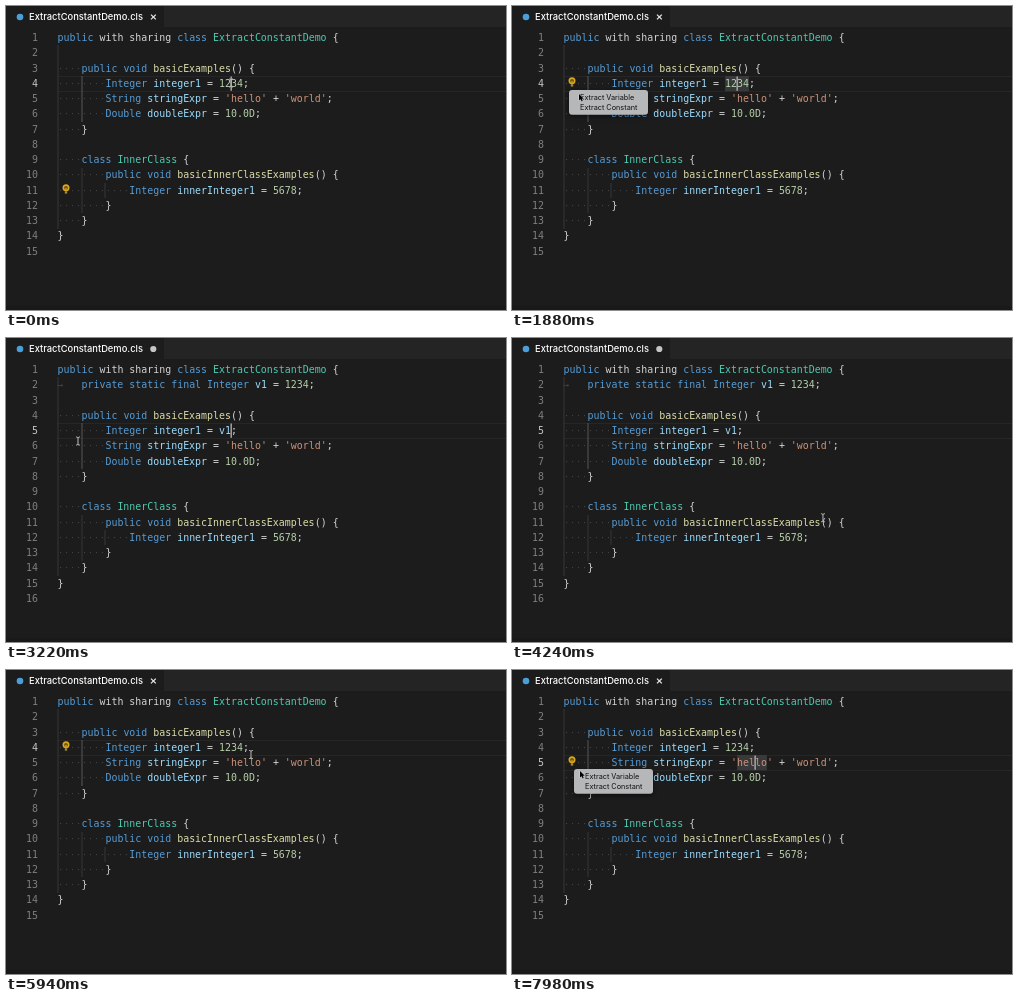
Recreate the animation shown at these times as an HTML page with a canvas. Size 500 by 304 pixels, loop 8000 ms.

```html
<!DOCTYPE html>
<html lang="en">
<head>
<meta charset="utf-8">
<title>Extract constant</title>
<style>
  html, body { margin: 0; width: 100%; height: 100%; overflow: hidden; background: #1c1c1c; }
  canvas { display: block; width: 500px; height: 304px; }
</style>
</head>
<body>
<canvas id="stage"></canvas>
<script>
const W = 500, H = 304, LOOP = 8000;
const canvas = document.getElementById('stage');
const ctx = canvas.getContext('2d');
const dpr = window.devicePixelRatio || 1;
canvas.width = W * dpr;
canvas.height = H * dpr;

const MONO = '9.93px "DejaVu Sans Mono", monospace';
const UI = 'Inter, "Open Sans", sans-serif';
const X0 = 51.6, CHAR = 5.98, TOP = 24.1, ROW = 15.27;

const colX = col => X0 + col * CHAR;
const rowY = line => Math.round(TOP + (line - 1) * ROW);
const baseY = line => Math.round(34.97 + (line - 1) * ROW);

const CODE = [
  'public with sharing class ExtractConstantDemo {',
  '',
  '    public void basicExamples() {',
  '        Integer integer1 = 1234;',
  "        String stringExpr = 'hello' + 'world';",
  '        Double doubleExpr = 10.0D;',
  '    }',
  '',
  '    class InnerClass {',
  '        public void basicInnerClassExamples() {',
  '            Integer innerInteger1 = 5678;',
  '        }',
  '    }',
  '}',
  ''
];

// The same file after the number became a constant
const EXTRACTED = CODE.map(s => s.replace('1234', 'v1'));
EXTRACTED.splice(1, 0, '\t   private static final Integer v1 = 1234;');

const RULES = [
  [/^'[^']*'/, '#ce9178'],
  [/^\d[\d.]*D?/, '#b5cea8'],
  [/^(public|private|static|final|class|void|Integer|String|Double)\b/, '#569cd6'],
  [/^(with|sharing)\b/, '#d4d4d4'],
  [/^(ExtractConstantDemo|InnerClass)\b/, '#4ec9b0'],
  [/^\w+(?=\()/, '#dcdcaa'],
  [/^\w+/, '#9cdcfe'],
  [/^[^\w\s']+/, '#d4d4d4']
];

function tokenize(line) {
  const out = [];
  let col = 0;
  while (col < line.length) {
    const rest = line.slice(col);
    const rule = RULES.find(([re]) => re.test(rest));
    const text = rule ? rest.match(rule[0])[0] : rest[0];
    if (rule) out.push({ col, text, color: rule[1] });
    col += text.length;
  }
  return out;
}

const makeDoc = lines => lines.map(s => ({
  indent: s.length - s.trimStart().length,
  tab: s[0] === '\t',
  tokens: tokenize(s)
}));
const plainDoc = makeDoc(CODE), editedDoc = makeDoc(EXTRACTED);

// Mouse path: time, x, y
const PATH = [
  [0, 225, 77], [200, 225, 77], [1000, 57, 77], [1720, 57, 77],
  [1880, 67, 88], [2100, 72, 97], [2420, 72, 101], [3220, 72, 103],
  [3360, 74, 103], [3460, 190, 196], [3580, 309, 182], [4160, 309, 182],
  [4780, 351, 134], [5340, 351, 134], [5940, 245, 84.5], [6300, 243, 91],
  [6500, 243, 91], [6960, 86, 84], [7080, 81, 85], [7400, 62, 92],
  [7600, 62, 92], [7980, 68, 101], [8000, 68, 101]
];

const within = (t, a, b) => t >= a && t < b;

function mouseAt(t) {
  const i = Math.max(1, PATH.findIndex(p => p[0] > t));
  const [ta, xa, ya] = PATH[i - 1], [tb, xb, yb] = PATH[i];
  const u = (t - ta) / (tb - ta), k = u * u * (3 - 2 * u);
  return { x: xa + (xb - xa) * k, y: ya + (yb - ya) * k };
}

function stateAt(t) {
  const edited = within(t, 2600, 5400);
  const second = t >= 6300;
  const s = { edited, line: edited || second ? 5 : 4, caret: null, word: null, bulb: 0, menu: null };

  if (within(t, 0, 500) || within(t, 1000, 3340) || within(t, 5400, 5900)) s.caret = 29;
  else if (within(t, 6300, 6800) || t >= 7300) s.caret = 32;

  if (within(t, 260, 2600)) s.word = [27, 4];
  else if (t >= 6550) s.word = [29, 5];

  if (t < 520) s.bulb = 11;
  else if (t < 2600 || within(t, 5700, 6620)) s.bulb = 4;
  else if (t >= 6620) s.bulb = 5;

  // The blinking caret is hidden just before the second menu opens
  if (within(t, 7080, 7400)) s.caret = null;

  if (within(t, 1100, 2400)) s.menu = { x: 57, y: 84, live: t > 1920 };
  else if (t >= 7600) s.menu = { x: 62, y: 99, live: false };
  return s;
}

function rect(x, y, w, h, color) {
  ctx.fillStyle = color;
  ctx.fillRect(x, y, w, h);
}

function disc(x, y, r, color) {
  ctx.fillStyle = color;
  ctx.beginPath();
  ctx.arc(x, y, r, 0, Math.PI * 2);
  ctx.fill();
}

function write(text, x, y, color, font, align = 'left') {
  ctx.font = font;
  ctx.textAlign = align;
  ctx.fillStyle = color;
  ctx.fillText(text, x, y);
}

function strokePath(points, color, width) {
  ctx.strokeStyle = color;
  ctx.lineWidth = width;
  ctx.beginPath();
  points.forEach(([x, y], i) => i ? ctx.lineTo(x, y) : ctx.moveTo(x, y));
  ctx.stroke();
}

function drawTab(edited) {
  rect(0, 0, W, 21, '#242425');
  rect(0, 0, 158, 21, '#1c1c1c');
  disc(14, 11, 3.3, '#4a9fd8');
  write('ExtractConstantDemo.cls', 23, 14.3, '#ffffff', '500 9.35px ' + UI);
  if (edited) {
    disc(147.3, 11, 3.1, '#c5c5c5');
  } else {
    strokePath([[145, 8.6], [149.8, 13.4]], '#e8e8e8', 1.3);
    strokePath([[149.8, 8.6], [145, 13.4]], '#e8e8e8', 1.3);
  }
}

function drawGuides(edited) {
  const d = edited ? 1 : 0;
  const guide = (col, from, to, color) =>
    rect(Math.round(colX(col)) - 0.5, rowY(from + d), 1, rowY(to + d + 1) - rowY(from + d), color);
  guide(0, 2 - d, 13, '#363636');
  guide(4, 4, 6, '#565656');
  guide(4, 10, 12, '#363636');
  guide(8, 11, 11, '#363636');
}

function drawCode(doc, active) {
  doc.forEach((row, i) => {
    const n = i + 1, y = baseY(n);
    write(n, 32, y, n === active ? '#c6c6c6' : '#7f7f7f', MONO, 'right');
    if (row.tab) {
      write('→', colX(0), y, '#454545', MONO);
    } else {
      for (let c = 0; c < row.indent; c++) disc(colX(c + 0.5), y - 3.4, 0.6, '#4a4a4a');
    }
    row.tokens.forEach(k => write(k.text, colX(k.col), y, k.color, MONO));
  });
}

function drawBulb(line) {
  const y = baseY(line) - 6.2;
  disc(60, y, 3.5, '#d9a81c');
  disc(60, y, 1.9, '#6a5216');
  rect(59.4, y, 1.2, 3.4, '#d9a81c');
  rect(58.8, y + 3.4, 2.4, 2.4, '#a58a3c');
}

function drawMenu({ x, y, live }, mouse) {
  ctx.save();
  ctx.shadowColor = 'rgba(0,0,0,.5)';
  ctx.shadowBlur = 4 * dpr;
  ctx.shadowOffsetY = 1.5 * dpr;
  ctx.fillStyle = '#b5b7b8';
  ctx.beginPath();
  ctx.roundRect(x, y, 79, 24.8, 3);
  ctx.fill();
  ctx.restore();
  const hover = live ? (mouse.y < y + 12.4 ? 0 : 1) : -1;
  ['Extract Variable', 'Extract Constant'].forEach((label, i) => {
    const top = y + 2.4 + i * 10;
    if (i === hover) rect(x, top, 79, 10, '#3a7be4');
    write(label, x + 11, top + 7.6, i === hover ? '#ffffff' : '#111111', '7.3px ' + UI);
  });
}

function drawArrow(x, y) {
  ctx.beginPath();
  [[0, 0], [0, 6.6], [1.6, 5.2], [2.7, 7.6], [3.8, 7.1], [2.8, 4.8], [4.8, 4.7]]
    .forEach(([dx, dy]) => ctx.lineTo(x + dx, y + dy));
  ctx.closePath();
  ctx.strokeStyle = '#d8d8d8';
  ctx.lineWidth = 0.9;
  ctx.stroke();
  ctx.fillStyle = '#000000';
  ctx.fill();
}

function drawBeam(x, y) {
  const c = '#bcbcbc';
  strokePath([[x, y - 3.6], [x, y + 3.6]], c, 1);
  strokePath([[x - 2, y - 4.2], [x, y - 3.4], [x + 2, y - 4.2]], c, 0.9);
  strokePath([[x - 2, y + 4.2], [x, y + 3.4], [x + 2, y + 4.2]], c, 0.9);
}

function draw(t) {
  const s = stateAt(t), mouse = mouseAt(t);
  ctx.setTransform(dpr, 0, 0, dpr, 0, 0);
  rect(0, 0, W, H, '#1c1c1c');
  rect(0, 300, W, 4, '#191919');
  drawTab(s.edited);

  rect(51, rowY(s.line), W - 51, 1, '#262626');
  rect(51, rowY(s.line + 1), W - 51, 1, '#262626');
  if (s.word) {
    const [col, len] = s.word;
    rect(colX(col), rowY(s.line), len * CHAR, ROW, '#37393b');
  }
  drawGuides(s.edited);
  drawCode(s.edited ? editedDoc : plainDoc, s.line);
  if (s.bulb) drawBulb(s.bulb);
  if (s.caret !== null) rect(colX(s.caret) - 0.5, rowY(s.line) + 0.5, 1.3, 14.3, '#b8b8b4');
  if (s.menu) drawMenu(s.menu, mouse);
  if (s.menu || mouse.x < 71) drawArrow(mouse.x, mouse.y);
  else drawBeam(mouse.x, mouse.y);
}

function tick() {
  draw(performance.now() % LOOP);
  requestAnimationFrame(tick);
}
tick();
</script>
</body>
</html>
```
